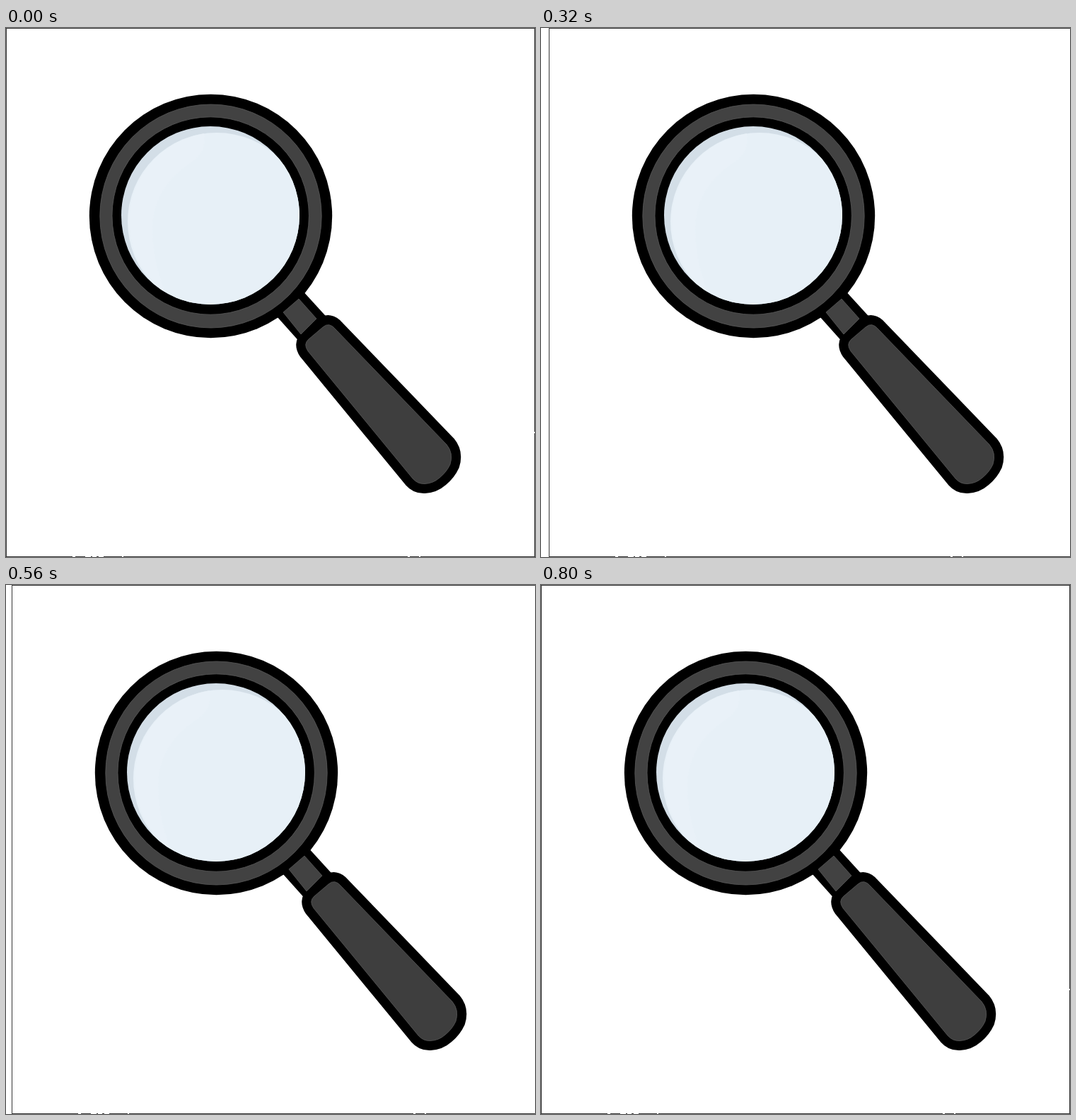
Animation, 748 px wide and 748 px high, one loop 0.88 s. Source, as an HTML page:

```html
<!DOCTYPE html>
<html lang="en">
<head>
<meta charset="utf-8">
<title>Magnifying glass</title>
<style>
  html, body { margin: 0; width: 100%; height: 100%; overflow: hidden; background: #fff; }
  svg { display: block; width: 748px; height: 748px; }
  .edge { stroke: #5a5a5a; stroke-width: .8; }
</style>
</head>
<body>
<svg viewBox="0 0 748 748">
  <defs>
    <clipPath id="lens"><circle cx="289" cy="265" r="126"/></clipPath>
    <path id="grip" d="M427 457Q420 447 428 440L448 423Q457 415 466 426L623 589Q633 601 628 617Q623 628 613 636Q604 644 592 644.5Q582 645 575 637Z"/>
  </defs>
  <g id="scene">
    <rect x=".5" y=".5" width="747" height="747" fill="none" stroke="#383838"/>
    <path d="M94 747.5h4M112 747.5h8M122 747.5h6M131 747.5h7M164 747.5h2M568 747.5h3M584 747.5h2M747.5 571v2" stroke="#fff"/>

    <path d="M375 399L418 370L460 416L417 446Z"/>
    <use href="#grip" stroke="#000" stroke-width="27" stroke-linejoin="round"/>
    <use href="#grip" class="edge" fill="#3e3e3e"/>

    <ellipse cx="289.5" cy="266" rx="171.7" ry="172.3"/>
    <ellipse class="edge" cx="289.5" cy="266" rx="156.7" ry="158" fill="#424242"/>
    <ellipse class="edge" cx="289.2" cy="265.5" rx="139.2" ry="139.7"/>
    <path class="edge" d="M392 402L414 383L439 411L417 433Z" fill="#424242"/>

    <g clip-path="url(#lens)">
      <rect x="160" y="136" width="258" height="258" fill="#d3dee7"/>
      <circle cx="298" cy="274" r="126" fill="#e7f0f7"/>
      <path d="M280 149Q284 176 262 190Q207 226 207 285Q208 335 226 375A126 126 0 0 1 280 149Z" fill="#e9f1f8"/>
    </g>
  </g>
</svg>
<script>
  const STEP = 80, COUNT = 11, SPEED = 2.8;

  // Slides right for five steps, then back again.
  const frames = Array.from({ length: COUNT }, (_, i) => ({
    transform: `translateX(${Math.round(SPEED * Math.min(i, COUNT - 1 - i))}px)`,
    offset: i / COUNT,
    easing: 'step-end'
  }));
  frames.push({ transform: 'translateX(0px)', offset: 1 });

  document.getElementById('scene').animate(frames, {
    duration: STEP * COUNT,
    iterations: Infinity
  });
</script>
</body>
</html>
```
